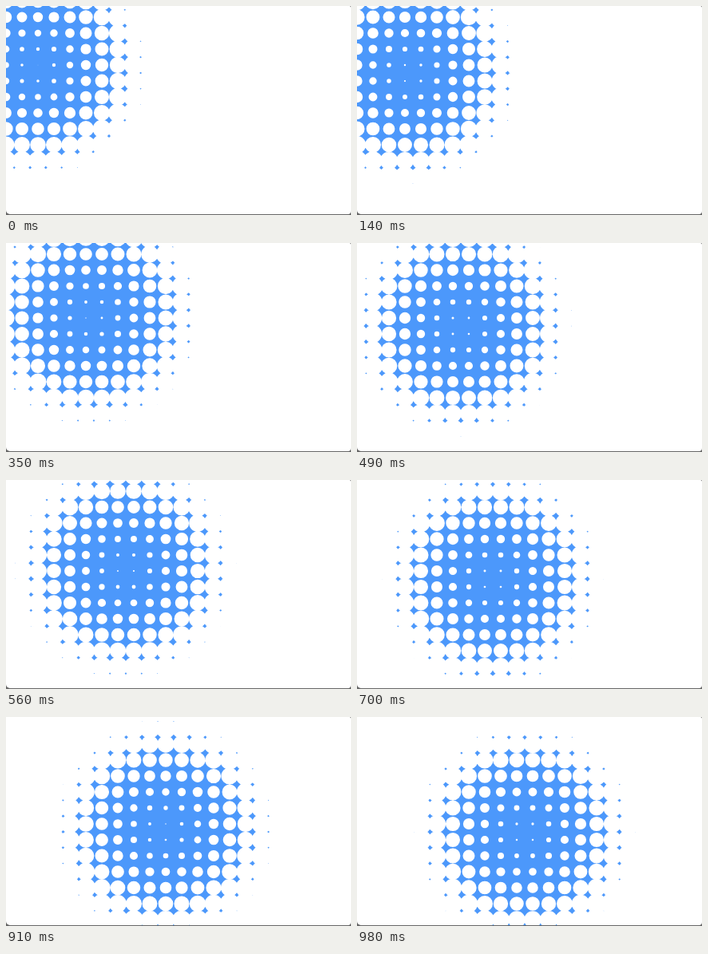
Animation, 432 px wide and 262 px high, one loop 1.05 s. Source, as an HTML page with a canvas:

```html
<!DOCTYPE html>
<html lang="en">
<head>
<meta charset="utf-8">
<title>Halftone spot</title>
<style>
  html, body { margin: 0; width: 100%; height: 100%; overflow: hidden; background: #666; }
  canvas { display: block; width: 432px; height: 261px; border-radius: 0 2px 4px 5px; }
</style>
</head>
<body>
<canvas id="stage" width="432" height="261"></canvas>
<script>
  const LOOP = 1050, STEP = 70, GRID = 20, TOP = -6, GROWTH = 0.1;
  // Spot path: step, x, y
  const PATH = [
    [0, 38, 76], [3, 80, 89], [5, 106, 92], [7, 131, 104.5],
    [8, 149, 112], [10, 170, 125], [12, 186, 134.5], [14, 210, 147]
  ];
  const canvas = document.getElementById('stage');
  const ctx = canvas.getContext('2d');
  let shown = -1;

  function spotAt(step) {
    let i = 0;
    while (i < PATH.length - 2 && PATH[i + 1][0] <= step) i++;
    const [s0, x0, y0] = PATH[i], [s1, x1, y1] = PATH[i + 1];
    const p = (step - s0) / (s1 - s0);
    return [x0 + (x1 - x0) * p, y0 + (y1 - y0) * p];
  }

  // White dots on blue grow with their distance from the spot
  function draw(step) {
    const [cx, cy] = spotAt(step);
    ctx.fillStyle = '#4c98fb';
    ctx.fillRect(0, 0, canvas.width, canvas.height);
    ctx.fillStyle = '#fff';
    ctx.beginPath();
    for (let y = TOP; y <= canvas.height + GRID; y += GRID) {
      for (let x = 0; x <= canvas.width + GRID; x += GRID) {
        const r = Math.min(16, Math.hypot(x - cx, y - cy) * GROWTH);
        ctx.moveTo(x + r, y);
        ctx.arc(x, y, r, 0, Math.PI * 2);
      }
    }
    ctx.fill();
  }

  function tick() {
    const step = Math.floor(performance.now() % LOOP / STEP);
    if (step !== shown) draw(shown = step);
    requestAnimationFrame(tick);
  }
  tick();
</script>
</body>
</html>
```
